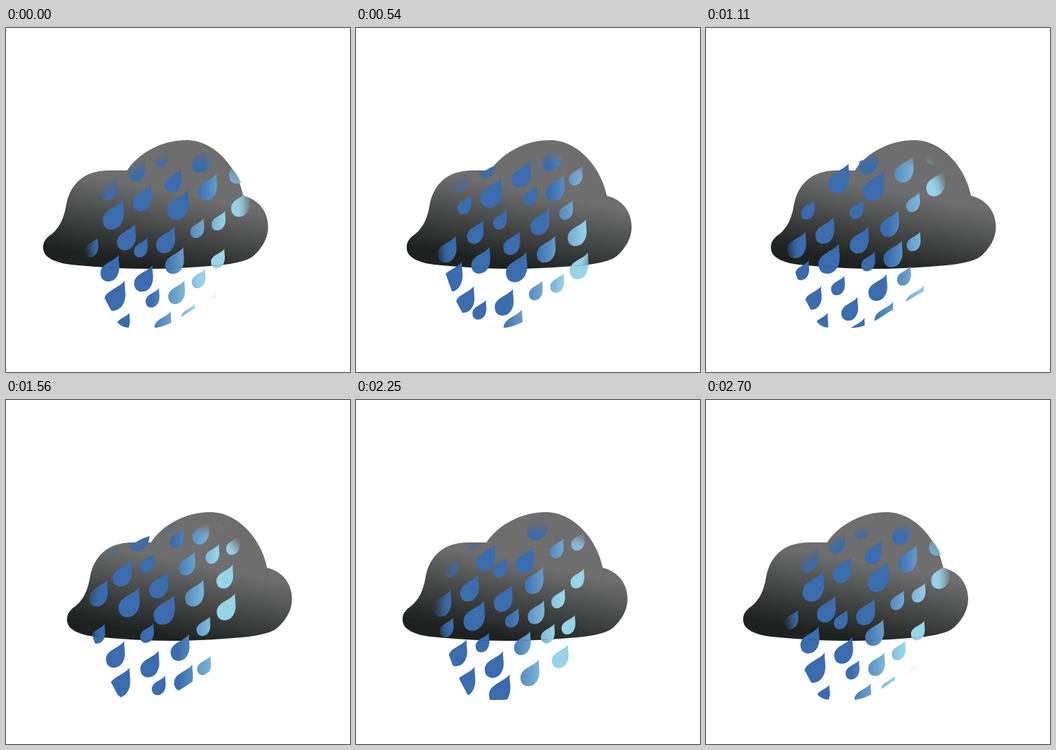
Recreate the animation shown at these times as an HTML page with a canvas. Size 500 by 500 pixels, loop 2730 ms.

```html
<!DOCTYPE html>
<html lang="en">
<head>
<meta charset="utf-8">
<title>Rain cloud</title>
<style>
  html, body { margin: 0; width: 100%; height: 100%; overflow: hidden; background: #fff; }
  canvas { display: block; width: 500px; height: 500px; }
</style>
</head>
<body>
<canvas id="stage" width="500" height="500"></canvas>
<script>
const SIZE = 500, STEP = 30, LOOP = 2730, CYCLE = 2700, TURN = 1230;
const SWAY = 44.7;
const FALL = { x: -83, y: 453 };
const BLUE = '#3a6cae', LIGHT = '#98d3e7';

const cloud = new Path2D(`M54 319 C54 309 60 304 67 299 C78 290 84 276 87 260
  C92 228 112 207 150 207 L176 207 C194 180 228 163 262 163
  C304 163 337 204 345 244 C368 249 381 268 381 289 C381 306 372 320 360 331
  C348 341 322 344 296 346 C250 350 190 352 130 347 C104 345 83 344 70 338
  C60 334 54 328 54 319 Z`);

// Area in which rain shows: hard edge below the cloud, soft edge on it.
const area = new Path2D(`M122 310 C122 325 124 338 128 350 C133 365 138 380 144 394
  L153 411 L162 428 C168 435 176 436 185 436 L210 436 C225 436 235 431 247 425
  L272 409 L307 388 L326 378 C340 350 350 305 349 262 C347 240 344 225 335 212
  C325 198 315 194 300 191 C285 187 275 187 260 187 C245 188 237 190 225 193
  C212 196 200 200 190 206 C174 214 160 220 150 232 C138 245 134 253 130 265
  C125 280 122 295 122 310 Z`);

// 44 units high, centred on its box
const drop = new Path2D(`M14.5 -22 C8 -11 -15.5 -8 -15.5 8 C-15.5 17 -10 22 -3 22
  C8 22 15 12 15.5 0 C15.8 -8 14 -14 14.5 -22 Z`);

// Drop centres at time zero, grouped by height
const small = [[226,188],[196,319],[278,291],[309,280],[124,319],[308,335],[280,364],
  [213,392],[170,428],[265,415],[295,402],[118,406],[182,78],[253,77],[335,67],
  [270,153],[336,124],[174,166],[322,174]];
const medium = [[190,206],[243,222],[248,384],[228,429],[283,448]];
const large = [[149,231],[284,191],[198,247],[293,231],[338,207],[341,255],[175,304],
  [232,308],[151,349],[200,364],[245,338],[134,443],[111,371],[322,19],[270,7],
  [368,39],[182,19],[301,98],[207,108],[257,122],[306,142],[166,129]];
const huge = [[156,271],[250,257],[158,389],[278,43],[227,32],[213,149]];

function makeCanvas() {
  const c = document.createElement('canvas');
  c.width = c.height = SIZE;
  return c.getContext('2d');
}

const ctx = document.getElementById('stage').getContext('2d');
const rain = makeCanvas();
const mask = makeCanvas();
mask.filter = 'blur(7px)';
mask.fill(area);

const shade = ctx.createLinearGradient(230, 236, 208, 346.6);
shade.addColorStop(0, '#6e6e6e');
shade.addColorStop(1, '#1d2120');

// The line between the two blues waves across the falling sheet.
function tint(x, y, scale) {
  const lane = x - y * FALL.x / FALL.y;
  const edge = 337 + 22 * Math.cos((y - 625) / FALL.y * 2 * Math.PI);
  const mid = edge - lane;
  const g = rain.createLinearGradient((mid - 33) / scale, 0, (mid + 33) / scale, 0);
  g.addColorStop(0, BLUE);
  g.addColorStop(1, LIGHT);
  return g;
}

const drops = [[28.5, small], [34.5, medium], [39, large], [44, huge]]
  .flatMap(([height, spots]) => spots.map(([x, y]) => {
    const scale = height / 44;
    return { x, y, scale, fill: tint(x, y, scale) };
  }));

function drawRain(t) {
  rain.globalCompositeOperation = 'source-over';
  rain.clearRect(0, 0, SIZE, SIZE);
  for (const d of drops) {
    let turns = t / CYCLE;
    turns -= Math.floor((d.y + FALL.y * turns - 8) / FALL.y);
    rain.save();
    rain.translate(d.x + FALL.x * turns, d.y + FALL.y * turns);
    rain.scale(d.scale, d.scale);
    rain.fillStyle = d.fill;
    rain.fill(drop);
    rain.restore();
  }
}

function draw(t) {
  const shift = SWAY * (t < TURN ? t / TURN : (CYCLE - t) / (CYCLE - TURN));
  drawRain(t);

  ctx.fillStyle = '#fff';
  ctx.fillRect(0, 0, SIZE, SIZE);
  ctx.save();
  ctx.clip(area);
  ctx.drawImage(rain.canvas, 0, 0);
  ctx.restore();

  rain.globalCompositeOperation = 'destination-in';
  rain.drawImage(mask.canvas, 0, 0);

  ctx.save();
  ctx.translate(shift, 0);
  ctx.fillStyle = shade;
  ctx.fill(cloud);
  ctx.clip(cloud);
  ctx.translate(-shift, 0);
  ctx.drawImage(rain.canvas, 0, 0);
  ctx.restore();
}

const start = performance.now();
function tick() {
  const t = (performance.now() - start) % LOOP;
  draw(Math.floor(t / STEP) * STEP);
  requestAnimationFrame(tick);
}
tick();
</script>
</body>
</html>
```
